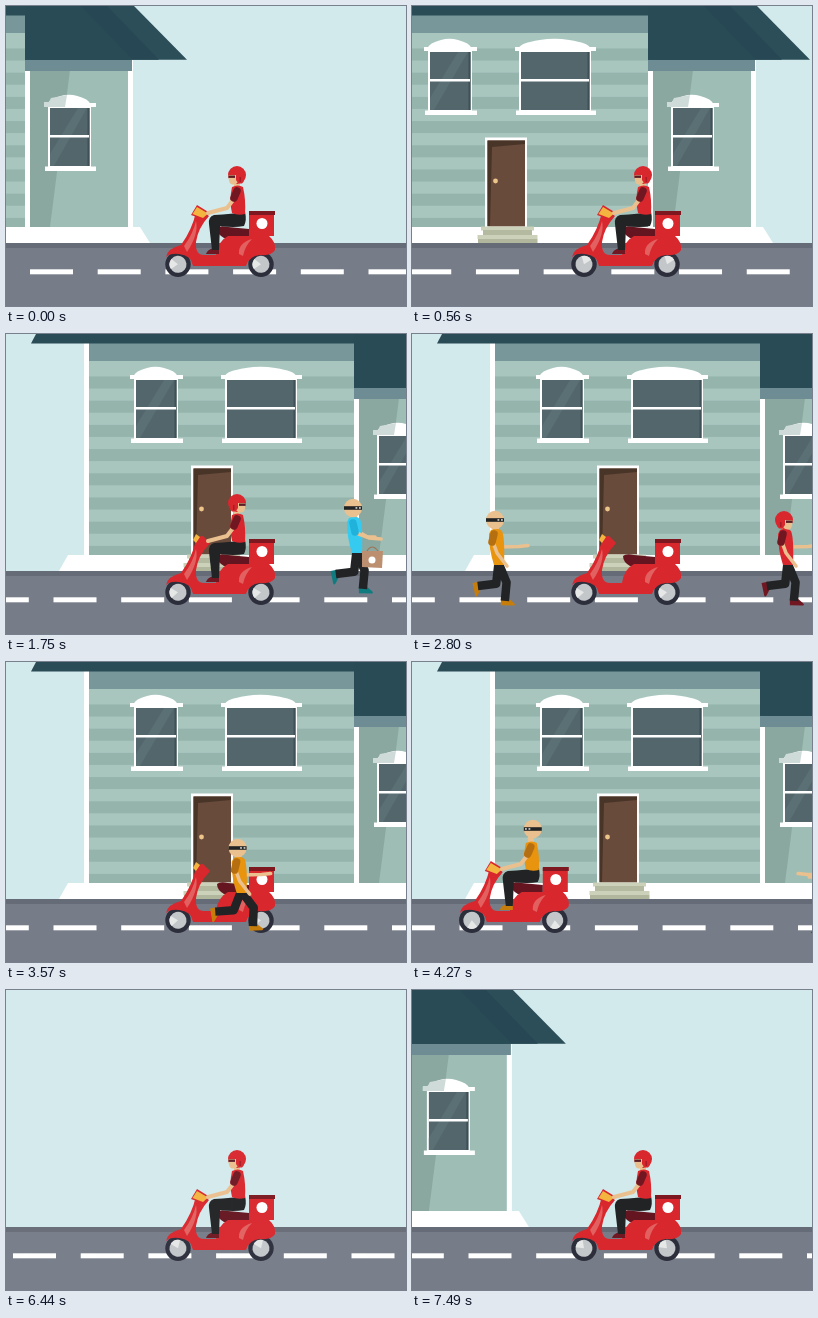
Recreate the animation shown at these times as an HTML page. Size 400 by 300 pixels, loop 7560 ms.

```html
<!DOCTYPE html>
<html>
<head>
<meta charset="utf-8">
<style>
html, body { margin: 0; width: 100%; height: 100%; overflow: hidden; background: #fff }
svg { display: block; width: 100vw; height: 100vh }
</style>
</head>
<body>
<svg id="stage" viewBox="0 0 400 300"></svg>
<script>
const LOOP = 7560, STEP = 70, STOP = 329, RUN = 0.193;
const FADE_START = 6100, FADE_END = 6450;
const SKIN = '#ebc08f', BLACK = '#222325', RED = '#d9272e', GLASS = '#52666b';

const rect = (x, y, w, h, fill) => `<rect x="${x}" y="${y}" width="${w}" height="${h}" fill="${fill}"/>`;
const poly = (points, fill) => `<polygon points="${points}" fill="${fill}"/>`;
const path = (d, fill) => `<path d="${d}" fill="${fill}"/>`;
const line = (d, color, width, cap = 'round') =>
  `<path d="${d}" fill="none" stroke="${color}" stroke-width="${width}" stroke-linecap="${cap}" stroke-linejoin="round"/>`;
const dot = (x, y, r, fill) => `<circle cx="${x}" cy="${y}" r="${r}" fill="${fill}"/>`;
const group = (transform, body) => `<g transform="${transform}">${body}</g>`;
const at = (x, y, body, flip) => group(`translate(${x} ${y})${flip ? ' scale(-1 1)' : ''}`, body);

// ---- House, in its parked position ----
function windowAt(x, y, w) {
  const r = x + w;
  return path(`M${x - 2} ${y - 4} Q${x - 1} ${y - 9} ${x + w * 0.28} ${y - 12} Q${x + w / 2} ${y - 14.5} ${r - w * 0.28} ${y - 12} Q${r + 1} ${y - 9} ${r + 2} ${y - 4}Z`, '#fff')
    + rect(x - 6, y - 5, w + 14, 4, '#fff')
    + rect(x - 2, y - 2, w + 5, 61, '#fff')
    + rect(x, y, w + 1.5, 58, GLASS)
    + rect(r - 0.5, y, 2, 58, '#3f5157')
    + (w < 50 ? poly(`${x},${y + 58} ${x},${y + 46} ${x + 28},${y} ${r - 1},${y} ${x + 4},${y + 58}`, '#5b7075') : '')
    + rect(x, y + 27, w + 1, 2.5, '#fff')
    + rect(x - 5, y + 58.5, w + 13, 4.5, '#fff');
}

function buildHouse() {
  let s = rect(83, 9, 266, 213, '#a8c6be');
  for (let y = 42.5; y < 215; y += 24.2) s += rect(83, y, 266, 12, '#94b4ac');
  s += rect(83, 9, 266, 18, '#77979b')
    + rect(78, 9, 5, 213, '#fff')
    + poly('25,9.5 30,0 349,0 349,9.5', '#2a4c57')
    + windowAt(130, 46, 39) + windowAt(221, 46, 67);
  // Side wing
  s += rect(353, 53, 98, 169, '#9ebdb5')
    + poly('353,64 393,64 373,221 353,221', '#8ba8a0')
    + rect(348, 53, 5, 169, '#fff') + rect(451, 53, 5, 169, '#fff')
    + rect(348, 54, 107, 11, '#6d8c93')
    + windowAt(373, 102, 38)
    + poly('390,89 388,101 367,101 367,96 372,96 374,92', '#cfdbd9')
    + poly('348,0 457,0 510,53.7 348,53.7', '#2b4e59')
    + poly('348,0 430,0 482,53.7 348,53.7', '#264753')
    + poly('348,0 404,0 456,53.7 348,53.7', '#294b56');
  // Plinth, door and steps
  s += poly('62,221 463,221 473,237 53,237', '#fff')
    + rect(185, 131.5, 42, 90, '#fff')
    + rect(187.5, 134.5, 37.5, 86, '#684b3b')
    + poly('187.5,134.5 225,134.5 225,138 192,141 190,220 187.5,220', '#493428')
    + dot(195.5, 175, 2.4, '#edc58a')
    + rect(181, 220.5, 53, 4, '#ccd2b9') + rect(183, 224, 49, 5, '#b4ba9f')
    + rect(177.5, 229, 60, 4, '#ccd2b9') + rect(178, 233, 59.5, 5, '#b1b79c');
  return s;
}
const house = buildHouse();

function backdrop(houseX, roadX) {
  let s = rect(0, 0, 400, 300, '#d3eaec')
    + at(houseX - STOP, 0, house)
    + rect(0, 237, 400, 63, '#777d88') + rect(0, 237, 400, 5, '#666c77');
  for (let x = roadX % 67.7 - 67.7; x < 400; x += 67.7) s += rect(x, 263.3, 43, 5, '#fff');
  return s;
}

// ---- People; all face right before flipping ----
const courier = { shirt: RED, sleeve: '#701722', shoe: '#701722', helmet: true };
const orange = { shirt: '#e8940f', sleeve: '#b56f10', shoe: '#c77d0a' };
const cyan = { shirt: '#35cbf0', sleeve: '#20b2da', shoe: '#107c80' };

function head(p) {
  if (!p.helmet)
    return `<ellipse rx="9" ry="9.3" fill="${SKIN}"/>` + rect(-9, -1.8, 18, 3.6, BLACK)
      + rect(2.5, -0.7, 1.8, 1.3, '#fff') + rect(6, -0.7, 1.8, 1.3, '#fff');
  return dot(0, 0, 9, RED)
    + path('M-1 0 H8.5 Q8.5 9 5 9.5 Q1 10 -1 7Z', SKIN)
    + rect(2, 0.5, 6.5, 2.4, '#5b1d25')
    + path('M-8 0 H1 V5 Q-1 9 -5 8.5 Q-8 6 -8 0Z', RED) + rect(-4, 2, 1.5, 5, '#a81c25');
}

function leg(phase, shoe) {
  const thigh = 0.13 + 0.56 * Math.sin(phase);
  const shin = thigh - 0.9 - 0.4 * Math.cos(phase - 5.85);
  const kx = 4 + 19 * Math.sin(thigh), ky = 45 + 19 * Math.cos(thigh);
  const fx = kx + 18.5 * Math.sin(shin), fy = ky + 18.5 * Math.cos(shin);
  const foot = group(`translate(${fx} ${fy}) rotate(${-shin * 57.3 - 5})`,
    path('M-4 -2 H4 L9 2 Q11 4 9 4.5 H-4Z', shoe));
  return foot + line(`M3.5 43 L${kx} ${ky} L${fx} ${fy}`, BLACK, 8.5, 'butt');
}

function runner(p, x, y, t, flip, bag) {
  const phase = t / 420 * 2 * Math.PI - Math.PI / 2;
  const hangs = !flip && !bag;
  const farArm = line(bag ? 'M6 24 L16 30 L28 31' : 'M4 27 L24 26.5 L33 25.5', SKIN, 3.6);
  const nearArm = (hangs ? line('M-2 22 L2 33 L12 46', SKIN, 3.6) : line('M3 25 L14 29 L22 29', SKIN, 3.6))
    + line(hangs ? 'M-1 14 L-3 22' : 'M0 15 L2 24', p.sleeve, 7.5);
  const parcel = bag
    ? line('M14 43 Q19 35 25 43', '#9c7356', 1.2) + poly('9,43 30,43 29,60 9,59', '#bb8f70') + dot(19, 52, 3.5, '#fff') : '';
  return at(x, y, leg(phase + Math.PI, p.shoe) + leg(phase, p.shoe)
    + rect(-2, 5, 6, 7, SKIN) + farArm
    + path('M-4 10 Q3 7 7 11 Q10 18 9 45 H-1 Q-6 30 -6 14Z', p.shirt)
    + nearArm + parcel + head(p), flip);
}

function seated(p, lookBack) {
  return path('M200 248 Q201 244 207 242 H213 V248Z', p.shoe)
    + path('M239 206 Q226 208 208 209 Q202 211 203 218 L206 244 H213 L214 220 Q228 222 238 220 Q241 214 239 206Z', BLACK)
    + rect(228, 175, 6, 7, SKIN)
    + path('M226 181 Q232 178 237 181 Q240 194 239 208 Q232 210 226 207 Q223 194 226 181Z', p.shirt)
    + line('M227 194 L221 202 L202 207', SKIN, 4)
    + line('M231 185 L228 192', p.sleeve, 7.5)
    + at(p.helmet ? 231 : 233, p.helmet ? 169 : 167, head(p), !lookBack);
}

// ---- Scooter ----
const wheel = (x, spin) => dot(x, 258.3, 12.7, '#2c2e3b')
  + group(`translate(${x} 258.3) rotate(${spin})`, dot(0, 0, 8.5, '#c3c7c9')
  + path('M0 0 L-4 -7.5 A8.5 8.5 0 0 1 6 -6Z', '#e6e8e8'));

function scooter(roll, rider, parked) {
  const lamp = parked ? '187,206 190,200 194,203 190,209' : '186.5,208 191,201 202,207.5 197,212';
  const bars = parked ? '190,203 197,202 204,209 199,215 189,211' : '185,209 191,199 204,207 199,214';
  return wheel(172, -roll * 4) + wheel(255, -roll * 4)
    + rect(243, 206, 25, 24, RED) + rect(243, 205, 26, 4, '#7d1821') + dot(256, 217.5, 5.5, '#fff')
    + path('M211 222 Q214 219 222 221 L243 223 V232 H218 Q211 228 211 222Z', '#651520')
    + path('M190 206 L203 210 Q192 222 190 236 Q189 249 198 249 L210 249 Q212 235 222 230 L263 230 Q270 236 269 244 Q266 250 254 249 Q243 250 240 260 H187 Q185 249 173 248 Q164 247 160 251 Q162 242 175 239 Q186 224 190 206Z', RED)
    + path('M178 240 Q187 228 190 215 Q193 228 181 246Z', '#e2605f')
    + path('M233 248 Q232 237 246 233 Q239 240 237 250Z', '#e2605f')
    + poly(bars, RED) + poly(lamp, '#f3b53f')
    + rider;
}

// ---- Story ----
function chase(t) {
  const roadX = 24 + Math.min(t * 0.434, STOP + 33);
  let s = backdrop(Math.min(t * 0.3875, STOP), roadX);

  if (t >= 840 && t < 2200) {
    const x = 347 + RUN * (t - 1750), turn = 1450;
    s += t < turn ? runner(cyan, 289 + RUN * (turn - t), 174, t, true)
      : runner(cyan, x, 174, t, false, true);
  }

  const drive = Math.max(0, t - 3930) * 0.33;
  const rider = t < 2065 ? seated(courier, t > 1500) : t >= 3577 ? seated(orange) : '';
  const parked = t > 1500 && t < 3577;
  if (drive < 290) s += at(-drive, 0, scooter(roadX + drive, rider, parked));

  if (t >= 2065 && t < 3200) s += runner(courier, 372 + RUN * (t - 2800), 186, t);
  if (t >= 2100 && t < 3577) s += runner(orange, 83 + RUN * (t - 2800), 186, t);
  if (t >= 4100) s += runner(courier, 176 - RUN * (t - 5530), 186, t, true);
  return s;
}

function ride(t) {
  const roadX = 56.5 + (t - 7490) * 0.434 + 677;
  return backdrop((t - LOOP) * 0.3875, roadX) + scooter(roadX, seated(courier));
}

const stage = document.getElementById('stage');
const start = performance.now();
let shown = -1;

function draw(now) {
  const t = Math.floor((Math.max(0, now - start) % LOOP) / STEP) * STEP;
  if (t !== shown) {
    shown = t;
    const p = Math.min(1, Math.max(0, (t - FADE_START) / (FADE_END - FADE_START)));
    stage.innerHTML = (p < 1 ? `<g opacity="${1 - p}">${chase(t)}</g>` : '')
      + (p > 0 ? `<g opacity="${p}">${ride(t)}</g>` : '');
  }
  requestAnimationFrame(draw);
}
draw(start);
</script>
</body>
</html>
```
